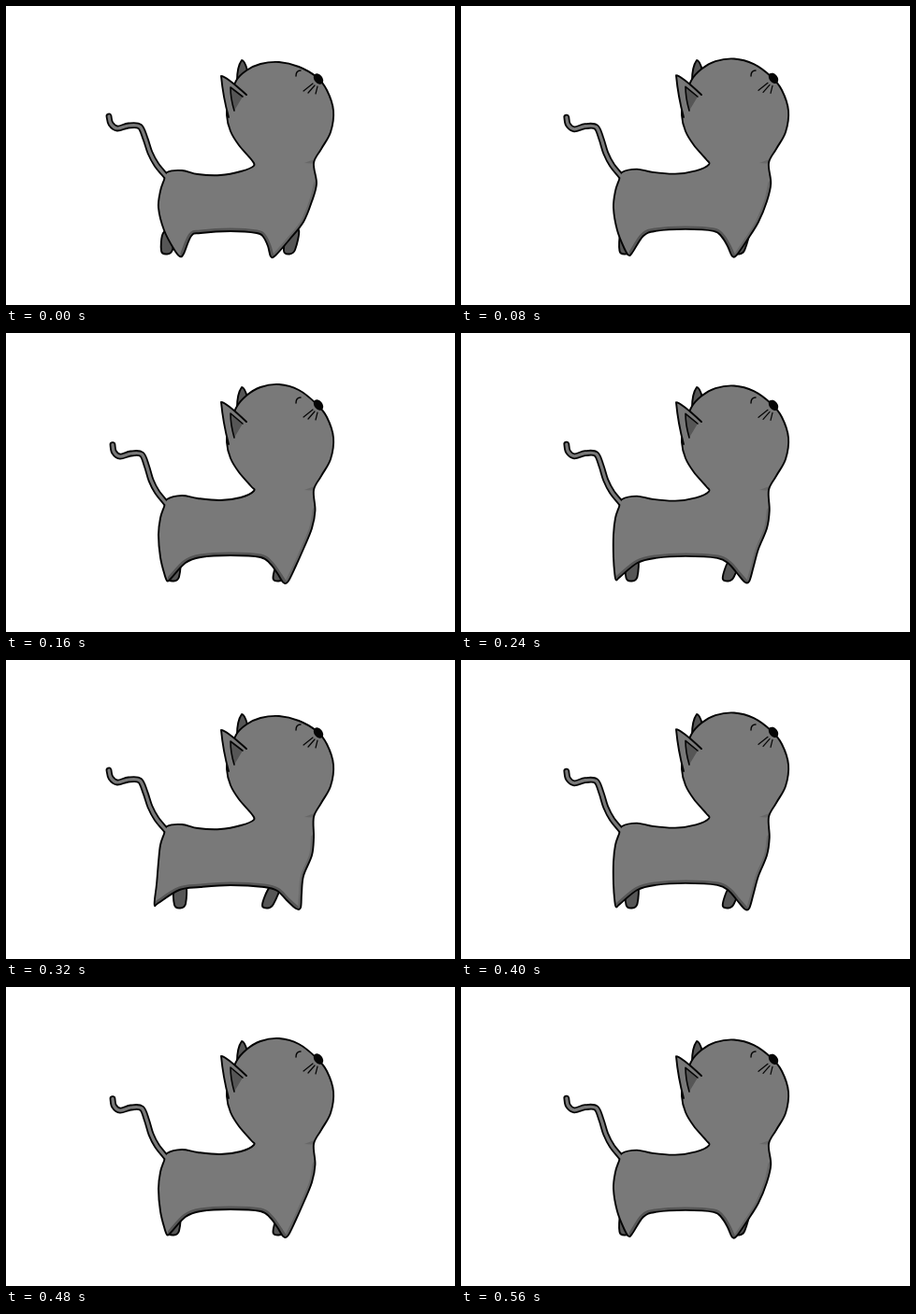
An HTML page with a canvas for the animation above (0.64 s loop, 480x320 px).

```html
<!DOCTYPE html>
<html lang="en">
<head>
<meta charset="utf-8">
<title>Walking cat</title>
<style>
html, body { margin: 0; width: 100%; height: 100%; overflow: hidden; background: #fff; }
canvas { display: block; width: 480px; height: 320px; }
</style>
</head>
<body>
<canvas id="stage" width="480" height="320"></canvas>
<script>
const ctx = document.getElementById('stage').getContext('2d');
const STEP = 80, STEPS = 8;
const FUR = '#797979', SHADE = '#565656', CREASE = '#686868', INK = '#050505';

const mix = (a, b, t) => a + (b - a) * t;

// Smooth curve through the given points
function spline(pts, closed) {
  const path = new Path2D(), n = pts.length;
  const at = i => closed ? pts[(i + n) % n] : pts[Math.max(0, Math.min(n - 1, i))];
  path.moveTo(...pts[0]);
  for (let i = 0; i < (closed ? n : n - 1); i++) {
    const [a, b, c, d] = [at(i - 1), at(i), at(i + 1), at(i + 2)];
    path.bezierCurveTo(b[0] + (c[0] - a[0]) / 6, b[1] + (c[1] - a[1]) / 6,
      c[0] - (d[0] - b[0]) / 6, c[1] - (d[1] - b[1]) / 6, ...c);
  }
  if (closed) path.closePath();
  return path;
}

function stroke(path, color = INK, width = 1.9) {
  ctx.strokeStyle = color;
  ctx.lineWidth = width;
  ctx.stroke(path);
}

function shape(path, fill) {
  ctx.fillStyle = fill;
  ctx.fill(path);
  stroke(path);
}

// lift (0 to 1) raises the head, back and belly
const headPoints = lift => [
  [265, 171 - 2 * lift], [262, 164], [249, 149], [240, 134], [236, 117],
  [238, 103], [246, 80], [257, 69 - 2 * lift], [272, 62 - 4 * lift],
  [292, 60 - 5 * lift], [313, 65 - 4 * lift], [332, 76], [343, 90],
  [350, 112], [347, 135], [337, 153]];

const backPoints = lift => [
  [172, 178], [188, 176 - 2 * lift], [205, 180 - 3 * lift],
  [229, 181 - 2 * lift], [251, 177 - lift]];

// stride runs from 0 (near feet together) to 1 (near feet apart)
const forePoints = (stride, belly) => {
  const foot = mix(285, 312, stride), y = 268 - 2 * stride;
  return [
    [329, 168], [mix(332, 329, stride), 190], [327, 209], [318, 231],
    [mix(303, 316, stride), 250], [foot + 3, y - 1], [foot - 2, y],
    [foot - mix(5, 12, stride), 257], [mix(275, 290, stride), 247],
    [mix(268, 276, stride), belly + 1]];
};

const hindPoints = (stride, belly) => {
  const foot = mix(187, 160, stride), y = 268 - 5 * stride;
  return [
    [208, belly + 1], [mix(foot, 208, 0.53), 246], [foot + 3, y - 3],
    [foot - 1, y], [foot - mix(7, 1, stride), y - 7],
    [mix(169, 161, stride), 240], [163, 216], [165, 198], [169, 186]];
};

const tailPoints = lift => [
  [110, 118], [112, 126], [119, 131], [131, 128], [143, 129],
  [149, 142], [154, 157], [161, 170], [171, 182]
].map(([x, y], i) => [x + lift * (4 - i / 2), y + lift * (1.6 - i / 5)]);

function drawFarLeg(hip, foot) {
  shape(spline([[hip - 6, 243], [foot - 4, 262], [foot + 2, 265.5],
    [foot + 8, 261], [hip + 6, 240]], true), SHADE);
}

function drawFace(x, y) {
  stroke(new Path2D(
    `M${x - 6} ${y + 5}l-10 8M${x - 4} ${y + 7}l-7 8M${x - 1} ${y + 8}l-2 8`), INK, 1.2);
  stroke(new Path2D('M315 69q-5 0-5 6'), INK, 1.4);
  ctx.fillStyle = INK;
  ctx.beginPath();
  ctx.ellipse(x, y, 6.3, 4.4, 0.9, 0, 7);
  ctx.fill();
}

function drawEar(x, y) {
  shape(new Path2D(`M238 119Q${x + 2} ${y + 22} ${x} ${y}Q${x + 5} ${y} 257 95`), FUR);
  const inner = new Path2D(`M244 112Q${x + 10} ${y + 24} ${x + 10} ${y + 12}L253 97`);
  ctx.fillStyle = SHADE;
  ctx.fill(inner);
  stroke(inner, INK, 1.6);
}

function drawCat(phase) {
  const stride = 1 - Math.abs(1 - 2 * phase);
  const lift = Math.abs(Math.sin(2 * Math.PI * phase));
  const belly = 242 - 3 * lift;
  const fore = forePoints(stride, belly), hind = hindPoints(stride, belly);
  const under = [...fore, [240, belly - 1], ...hind];
  const body = spline([...backPoints(lift), ...headPoints(lift), ...under], true);
  const tail = spline(tailPoints(lift));

  ctx.clearRect(0, 0, 480, 320);
  ctx.lineCap = ctx.lineJoin = 'round';

  stroke(tail, INK, 6.8);
  shape(new Path2D('M247 80Q247 65 252 58q3 0 6 11'), SHADE);
  drawFarLeg(mix(174, 186, stride), mix(170, 184, stride));
  drawFarLeg(mix(307, 288, stride), mix(301, 278, stride));

  ctx.fillStyle = FUR;
  ctx.fill(body);
  ctx.save();
  ctx.clip(body);
  stroke(spline(fore.slice(1, 6)), CREASE, 6);
  stroke(spline(under.slice(6, 14)), SHADE, 7);
  ctx.fillStyle = CREASE;
  ctx.fill(new Path2D('M319 168l13 -5v6z'));
  ctx.restore();
  stroke(body);
  stroke(tail, FUR, 3.2);

  drawEar(230, 75 - lift);
  drawFace(334, 78 - lift);
}

function tick() {
  drawCat(Math.floor(performance.now() / STEP) % STEPS / STEPS);
  requestAnimationFrame(tick);
}
tick();
</script>
</body>
</html>
```
